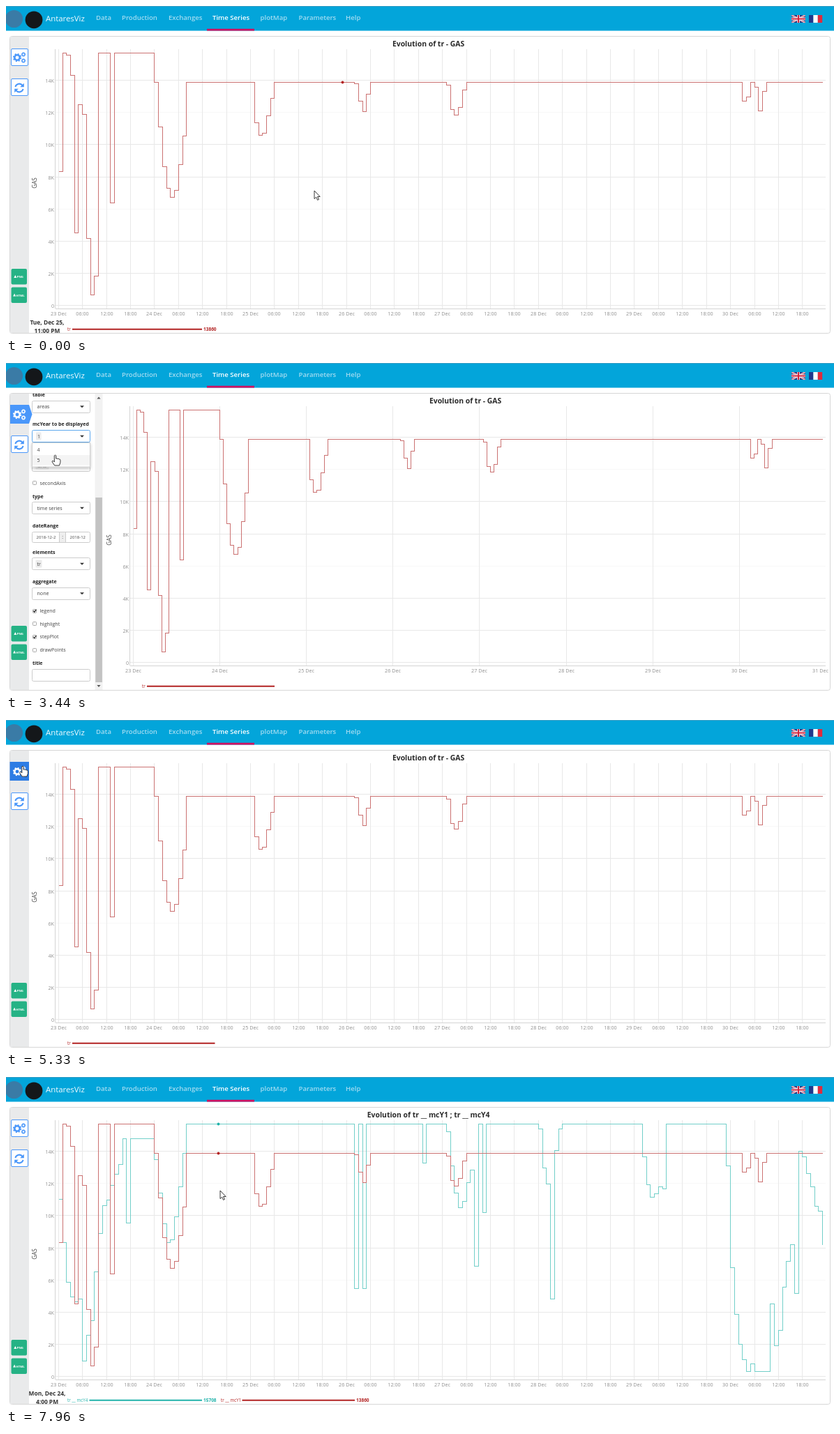
Recreate the animation shown at these times as an HTML page. Size 1187 by 472 pixels, loop 8 s.

```html
<!DOCTYPE html>
<html lang="en">
<head>
<meta charset="utf-8">
<title>Time Series</title>
<style>
  html, body { margin: 0; width: 100%; height: 100%; overflow: hidden; background: #fff; }
  svg { display: block; width: 100vw; height: 100vh; }
  text { font-family: "Open Sans", "Noto Sans", sans-serif; white-space: pre; }
  .crisp { shape-rendering: crispEdges; }
</style>
</head>
<body>
<svg id="stage" viewBox="0 0 1187 472">
  <defs>
    <clipPath id="panelClip"><rect x="33" y="44" width="94" height="425"/></clipPath>
    <filter id="soft" x="-20%" y="-20%" width="140%" height="150%">
      <feDropShadow dx="0" dy="2" stdDeviation="2" flood-opacity=".25"/>
    </filter>
  </defs>
  <g id="base"></g><g id="chart"></g><g id="hover"></g><g id="panel"></g><g id="side"></g><g id="cursor"></g>
</svg>
<script>
const LOOP = 8000, TOP = 15.708, FLAT = 13.86, LAST = 191;
const RED = '#b22222', TEAL = '#20b2aa', BLUE = '#4a97fa', DEEP = '#2d7ce4';

// ---------- drawing helpers ----------
const rect = (x, y, w, h, fill, extra = '') =>
  `<rect x="${x}" y="${y}" width="${w}" height="${h}" fill="${fill}" ${extra}/>`;
const line = (x1, y1, x2, y2, color, width = 1) =>
  `<line x1="${x1}" y1="${y1}" x2="${x2}" y2="${y2}" stroke="${color}" stroke-width="${width}"/>`;
const dot = (x, y, r, fill) => `<circle cx="${x}" cy="${y}" r="${r}" fill="${fill}"/>`;
// y is the middle of the line of text
const text = (x, y, s, size, fill, weight = 400, anchor = 'start') =>
  `<text x="${x}" y="${(y + size * .36).toFixed(2)}" font-size="${size}" fill="${fill}" font-weight="${weight}" text-anchor="${anchor}">${s}</text>`;
const half = v => Math.floor(v) + .5;

// ---------- data, in thousands per hour ----------
const hours = base => Array.from({ length: LAST + 1 }, (_, h) => base(h));
const dip = (data, start, ...vals) => vals.forEach((v, i) => data[start + i] = v);

const mcY1 = hours(h => h < 24 ? TOP : FLAT);
dip(mcY1, 0, 8.36, TOP, 15.57, 14.29, 4.55, 12.51, 11.9, 4.2, .66, 1.83);
dip(mcY1, 13, 6.41);
dip(mcY1, 25, 11.09, 8.66, 7.3, 6.74, 7.15, 8.75, 10.53);
dip(mcY1, 49, 11.35, 10.57, 10.7, 11.78, 12.9);
dip(mcY1, 74, 13.79, 12.73, 12.08, 13.16);
dip(mcY1, 97, 13.7, 12.2, 11.85, 12.3, 13.42);
dip(mcY1, 171, 12.73, 12.95, FLAT, 13.59, 12.12, 13.33);

const mcY4 = hours(h => h < 24 ? 14.8 : h > 171 && h < 178 ? .35 : TOP);
dip(mcY4, 0, 11, 8.36, 5.89, 4.98, 4.68, 4.85, 1, 2.6, 3.51, 6.54, 8.92, 10.65, 10.96, 11.87, 12.6, 13.2);
dip(mcY4, 17, 9.53);
dip(mcY4, 24, 13.5, 11.39, 9.49, 8.36, 8.53, 9.96, 11.82, FLAT);
dip(mcY4, 74, 5.5, TOP, 5.5);
dip(mcY4, 91, 13.25);
dip(mcY4, 97, 15.2, 13.08, 11.39, 10.52, 10.91, 12.04, 12.86, 6.85, TOP, 10.22);
dip(mcY4, 120, 15.41, 12.99, 11.99, 4.85, 14.07, 15.41);
dip(mcY4, 146, 13.68, 11.95, 11.13, 11.35, 11.82, 11.69);
dip(mcY4, 167, 13.08, 6.76, 3.9, 2.04, 1.05);
dip(mcY4, 173, .83);
dip(mcY4, 178, 4.51, 1.95, 2.9, 5.59, 7.15, 8.23, 5.2, 14, 13.68, 12.64, 11.78, 10.57, 10.3, 8.2);

// ---------- chart ----------
const yOf = v => 430.2 - v * 23.11;
const wide = { x0: 75.3, step: 5.734, tick: 6, mid: 605.6 };
const narrow = { x0: 182, step: 5.176, tick: 24, mid: 658.6 };
const xOf = (view, h) => view.x0 + h * view.step;

function stepPath(view, data, color) {
  let d = '';
  data.forEach((v, h) => {
    const x = half(xOf(view, h)), y = half(yOf(v));
    d += h ? `H${x}V${y}` : `M${x} ${y}`;
  });
  return `<path class="crisp" d="${d}" fill="none" stroke="${color}"/>`;
}

function drawChart(view, title, both) {
  const left = half(view.x0 - 4.6), grey = '#8f8f8f', grid = '#e8e8e8', axis = '#d4d4d4';
  let s = '<g class="crisp">', labels = '';
  for (let k = 0; k <= 14; k += 2) {
    const y = half(yOf(k) - .3);
    s += line(left, y, 1175, y, k && k % 6 === 0 ? '#f8f8f8' : grid);
    labels += text(left - 1.5, y + .8, k ? k + 'K' : '0', 7.2, grey, 400, 'end');
  }
  for (let h = 0; h < LAST; h += view.tick) {
    const x = half(xOf(view, h)), hour = h % 24;
    s += line(x, 62, x, 434, grid);
    labels += text(x, 441, hour ? String(hour).padStart(2, '0') + ':00' : 23 + h / 24 + ' Dec', 7.2, grey, 400, 'middle');
  }
  if (view === narrow) labels += text(1167.5, 441, '31 Dec', 7.2, grey, 400, 'middle');
  s += line(left, 62, left, 434, axis) + line(left, 434.5, 1175, 434.5, axis) + '</g>' + labels;
  s += text(view.mid, 54.5, title, 10.4, '#2a2a2a', 700, 'middle');
  s += `<g transform="translate(${view.x0 - 34.3} 254) rotate(-90)">${text(0, 0, 'GAS', 8.2, '#444', 400, 'middle')}</g>`;
  if (both) s += stepPath(view, mcY4, '#72cfc9');
  return s + stepPath(view, mcY1, '#cb7272');
}
const charts = {
  wide: drawChart(wide, 'Evolution of tr - GAS'),
  narrow: drawChart(narrow, 'Evolution of tr - GAS'),
  both: drawChart(wide, 'Evolution of tr __ mcY1 ; tr __ mcY4', true)
};

function drawHover(mode, hour) {
  const on = hour >= 0;
  const item = (x, label, from, to, color, data) => {
    const end = on ? to - 18.5 : to;
    return text(x, 463.5, label, 6.2, color) + line(from, 463.7, end, 463.7, color, 2) +
      (on ? text(end + 2, 463.5, Math.round(data[hour] * 1000), 6.5, color, 700) +
            dot(half(xOf(wide, hour)), half(yOf(data[hour])), 2, color) : '');
  };
  if (mode === 'narrow') return item(195, 'tr', 202, 385, RED, mcY1);
  let s = '';
  if (on) {
    const day = Math.floor(hour / 24), h = hour % 24;
    const name = ['Sun', 'Mon', 'Tue', 'Wed', 'Thu', 'Fri', 'Sat'][day % 7];
    s = text(59, 454, `${name}, Dec ${23 + day},`, 8.4, '#333', 700, 'middle') +
        text(59, 466, `${h % 12 || 12}:00 ${h < 12 ? 'AM' : 'PM'}`, 8.4, '#333', 700, 'middle');
  }
  if (mode === 'wide') return s + item(88, 'tr', 95, 299.5, RED, mcY1);
  return s + item(88, 'tr __ mcY4', 119.5, 299.5, TEAL, mcY4) + item(308, 'tr __ mcY1', 338.5, 518.5, RED, mcY1);
}

// ---------- settings panel ----------
function drawPanel(list, chips, done) {
  const ink = '#444', edge = '#ccc';
  const label = (y, s) => text(38, y, s, 7, '#222', 700);
  const box = (y, color = edge, h = 17) => rect(37.5, half(y - h / 2), 83, h, '#fff', `rx="2" stroke="${color}"`);
  const caret = y => `<path d="M106 ${y - 1.2}h6l-3 3z" fill="#333"/>`;
  const select = (y, s, color) => box(y, color) + caret(y) + text(44.5, y, s, 7.1, ink);
  const chip = (x, y, s, w) => rect(x, y - 5.5, w, 11, '#ebebeb', 'rx="1"') + text(x + 2, y, s, 7.1, ink);
  const check = (y, s, on) => rect(38.5, half(y - 2.5), 5, 5, '#fff', 'stroke="#aaa" rx=".8"') +
    (on ? `<path d="M39.3 ${y}l1.5 1.7 2.6-3.6" fill="none" stroke="#222" stroke-width="1.2"/>` : '') +
    text(48.5, y, s, 7.1, ink);
  const low = y => y + (done ? 18.7 : 0);

  let s = rect(33, 44, 106, 425, '#fff') + '<g clip-path="url(#panelClip)">';
  s += label(45, 'table') + select(62.5, 'areas');
  s += label(87, 'mcYear to be displayed') + select(105, '', list ? '#5fa9ee' : edge);
  chips.forEach((c, i) => s += chip(43 + i * 9.3, 105, c, 7.5));
  s += label(130, 'variable') + select(147, '') + chip(42.5, 147, 'GAS', 19);
  s += check(172, 'secondAxis') + label(191, 'type') + select(208, 'time series');
  if (done) s += check(233.3, 'confidence interval');
  const d = low(249.5);
  s += label(low(233), 'dateRange') + box(d, edge, 15) + rect(76.5, half(d - 7.5), 9, 15, '#eee', 'stroke="#ccc"') +
    text(43.5, d, '2018-12-2', 6, ink) + text(81, d, ':', 6.5, ink, 400, 'middle') + text(91.5, d, '2018-12', 6, ink);
  s += label(low(271), 'elements') + select(low(288), '') + chip(42.5, low(288), 'tr', 9);
  s += label(low(313), 'aggregate') + select(low(330.5), 'none');
  ['legend', 'highlight', 'stepPlot', 'drawPoints'].forEach((name, i) =>
    s += check(low(355.5 + i * 18.7), name, i % 2 === 0));
  s += label(low(430), 'title') + box(low(447.5));
  if (list) {
    const rows = done ? ['5'] : ['4', '5'];
    s += rect(37.5, 114.5, 83, done ? 20 : 34.5, '#fff', 'stroke="#d0d0d0" filter="url(#soft)"');
    rows.forEach((r, i) => {
      if (done || i === list - 1) s += rect(38, 117.3 + i * 14.8, 82, 14.6, '#f4f4f4');
      s += text(44.5, 124.7 + i * 14.6, r, 7.1, ink);
    });
  }
  s += '</g>' + rect(127.5, 44, 11, 425, '#f2f2f2');
  s += rect(128.3, done ? 188 : 193, 9.6, done ? 258 : 265, '#c3c3c3');
  return s + '<path d="M130.4 51.5h5.2l-2.6-3zM130.4 462h5.2l-2.6 3z" fill="#555"/>';
}

// ---------- side strip ----------
const gear = (x, y, r, c) => `<g fill="none" stroke="${c}"><circle cx="${x}" cy="${y}" r="${r * .66}" stroke-width="${r * .45}"/>` +
  `<circle cx="${x}" cy="${y}" r="${r * .95}" stroke-width="${r * .3}" stroke-dasharray="${r * .373}"/></g>`;

function drawSide(open, hot) {
  const g = open || hot === 'gear', r = hot === 'refresh';
  const frame = 'stroke="#4a97fa" rx="1.5"', fill = hot === 'gear' ? DEEP : BLUE;
  let s = rect(6, 44, 27, 425, '#e9eaeb');
  if (open) s += `<path d="M6 60H33L37.5 73.5 33 87H6z" fill="${fill}"/>`;
  else s += g ? rect(5.5, 60, 27.5, 27, fill) : rect(7.5, 61.5, 24, 24, '#fff', frame);
  const c = g ? '#fff' : BLUE, k = r ? '#fff' : BLUE;
  s += gear(16, 74, 5.6, c) + gear(25, 69.5, 3, c) + gear(25, 78.5, 3, c);
  s += r ? rect(6.5, 104, 25.5, 25.5, DEEP, 'rx="1.5"') : rect(7.5, 104.5, 24, 24, '#fff', frame);
  for (const turn of [0, 180])
    s += `<g transform="translate(19 117.5) rotate(${turn})"><path d="M-5.6-1.5A5.8 5.8 0 0 1 4.6-3.6" fill="none" stroke="${k}" stroke-width="2"/>` +
      `<path d="M6.8-6.8V-1.2H1.2z" fill="${k}"/></g>`;
  const save = (y, name, x) => rect(7.5, y, 22.5, 22.5, '#25b285', 'rx="2"') +
    `<path d="M${x - 4.5} ${y + 13}h4l-2-4z" fill="#fff"/>` + text(x, y + 11.5, name, 4.2, '#fff', 700);
  return s + save(377, 'PNG', 15.8) + save(403.5, 'HTML', 14.6);
}

// ---------- page frame ----------
function drawBase() {
  let s = rect(0, 0, 1187, 35.5, '#03a5da') + rect(0, 0, 1187, 1, '#3f9fc4');
  s += dot(11.5, 18.5, 12.6, '#3a7ba6') + dot(40, 19.8, 12.4, '#14171a');
  s += text(57, 17.5, 'AntaresViz', 11.4, '#f2fbff');
  const nav = { Data: 129, Production: 166, Exchanges: 233, 'Time Series': 296, plotMap: 364.5, Parameters: 419.5, Help: 487 };
  for (const name in nav) s += text(nav[name], 17, name, 9.6, name === 'Time Series' ? '#fff' : '#a3dcf1', 600);
  s += rect(288, 32.7, 68, 2.8, '#d2105f');
  const bars = (d, white, red) => `<path d="${d}" stroke="#fff" stroke-width="${white}"/><path d="${d}" stroke="#d3233b" stroke-width="${red}"/>`;
  s += `<svg x="1126" y="13" width="20" height="11">${rect(0, 0, 20, 11, '#23337c')}` +
    bars('M0 0L20 11M20 0L0 11', 2.4, .8) + bars('M10 0V11M0 5.5H20', 3.8, 2.2) + '</svg>';
  ['#22388c', '#fff', '#e02b3d'].forEach((c, i) => s += rect(1151 + i * 6.4, 13, 6.4, 11, c));
  return s + rect(5.5, 43.5, 1176, 426, '#fff', 'rx="3" stroke="#d6d6d6"');
}

// ---------- pointer ----------
const ARROW = 'M0 0V11.6L2.7 9.2 4.6 13.4 6.5 12.5 4.6 8.5H8.2z';
const HAND = 'M-1.2 .9Q0-.6 1.2 .9V5.2Q2.6 4.4 3.4 5.5 4.8 4.8 5.6 6 7.2 5.6 7.4 7.4V10.6L6 15H-.8L-4.4 9.8Q-4.4 7.9-2.8 8.4L-1.2 10z';
const drawCursor = (x, y, hand) =>
  `<path transform="translate(${x} ${y})" d="${hand ? HAND : ARROW}" fill="#fff" stroke="#222" stroke-width=".9" stroke-linejoin="round"/>`;

// each stroke: first step, last step, end point
const strokes = [
  [90, 90, 406, 238], [920, 1360, 24, 66], [1720, 1900, 36, 79], [1990, 2070, 42, 78],
  [2260, 2530, 67, 93], [3170, 3440, 70.5, 132], [3620, 3980, 68.5, 126],
  [4530, 4880, 25, 95], [4970, 5060, 24, 66], [5610, 6230, 21.5, 116], [7520, 7960, 307, 163]
];
const TICK = 89;
function pointer(t) {
  let x = 442, y = 265;
  for (const [from, to, tx, ty] of strokes) {
    if (t < from) break;
    const steps = Math.round((to - from) / TICK) + 1;
    const p = t >= to ? 1 : Math.min(1, (Math.floor((t - from) / TICK) + 1) / steps);
    x += (tx - x) * p;
    y += (ty - y) * p;
  }
  return { x: +x.toFixed(1), y: +y.toFixed(1) };
}

// ---------- playback ----------
const shown = {};
function put(id, key, draw) {
  if (shown[id] === key) return;
  shown[id] = key;
  document.getElementById(id).innerHTML = draw();
}
function frame() {
  const t = (performance.now() - start) % LOOP;
  const { x, y } = pointer(t);
  const open = t >= 1540 && t < 5240, done = t >= 4250;
  const mode = open ? 'narrow' : t >= 6410 ? 'both' : 'wide';
  const inPlot = !open && x > wide.x0 && y > 62;
  const hour = !inPlot ? -1 : t < 90 ? 71 : Math.round((x - wide.x0) / wide.step);
  const over = x > 33 ? '' : y > 60 && y < 88 ? 'gear' : y > 102 && y < 130 ? 'refresh' : '';
  const hot = t >= 4790 && t < 4970 ? 'refresh' : over;
  const hand = over || open && x > 45 && y > 90 && y < 150;
  const list = t < 2710 ? 0 : t >= 3440 && t < 3620 ? 2 : 1;
  const chips = t >= 3710 ? ['1', '4'] : ['1'];

  put('chart', mode, () => charts[mode]);
  put('hover', mode + hour, () => drawHover(mode, hour));
  put('panel', [open, list, chips, done].join(), () => open ? drawPanel(list, chips, done) : '');
  put('side', open + hot, () => drawSide(open, hot));
  put('cursor', [x, y, !!hand].join(), () => drawCursor(x, y, hand));
  requestAnimationFrame(frame);
}
put('base', 'page', drawBase);
const start = performance.now();
frame();
</script>
</body>
</html>
```
